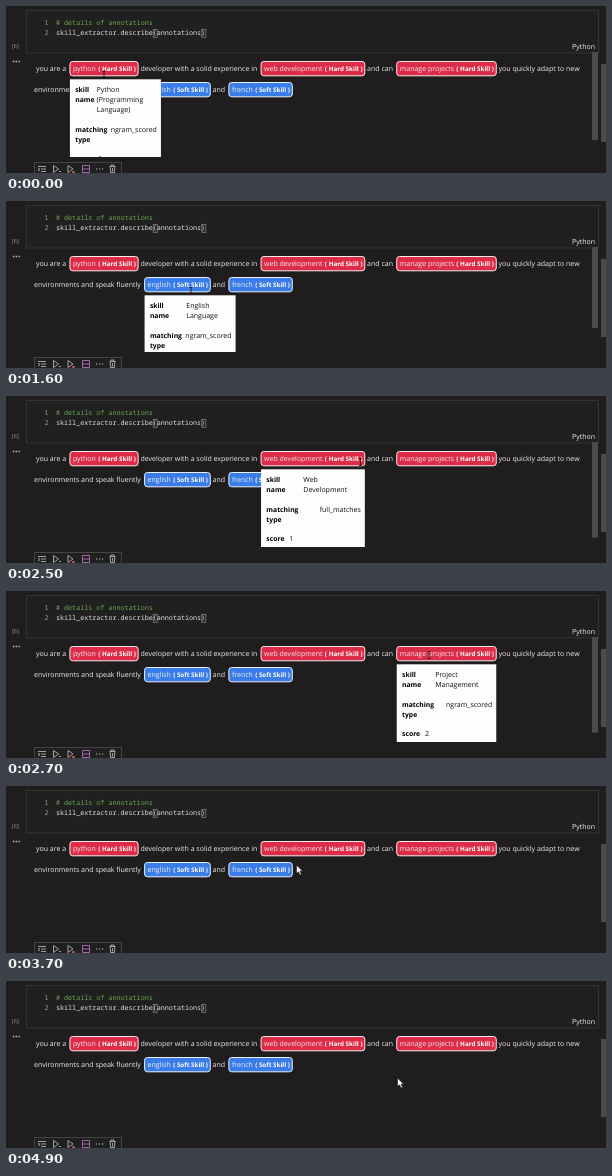
An HTML page for the animation above (5000 ms loop, 600 by 167 pixels).

```html
<!DOCTYPE html>
<html lang="en">
<head>
<meta charset="utf-8">
<title>Skill annotations</title>
<style>
  html, body { margin: 0; width: 100%; height: 100%; overflow: hidden; background: #1f1d1e; }
  svg { display: block; width: 600px; height: 167px; }
  text { font: 7px "Open Sans", "Noto Sans", sans-serif; fill: #eee; white-space: pre; text-rendering: geometricPrecision; }
  .code { font: 6.73px "Noto Sans Mono", "DejaVu Sans Mono", monospace; fill: #e4e4e4; }
  .comment { fill: #6aa84f; }
  .num { fill: #999; }
  .count { font-size: 5.5px; fill: #999; }
  .tag { font-size: 6.3px; font-weight: 700; fill: #fff; }
  .key { font-size: 6.8px; font-weight: 700; fill: #000; }
  .val { fill: #111; }
  .end { text-anchor: end; }
  .icon { fill: none; stroke: #c4c4c4; stroke-width: .8; }
</style>
</head>
<body>
<svg id="stage" viewBox="0 0 600 167">
  <defs><clipPath id="output"><rect width="600" height="151"/></clipPath></defs>
  <rect width="600" height="167" fill="#1f1d1e"/>
  <rect x="20.5" y="4.5" width="572" height="42.5" fill="#212021" stroke="#343334"/>
  <g fill="none" stroke="#8a8a8a" stroke-width=".7">
    <rect x="147.2" y="23.3" width="4" height="8"/>
    <rect x="195.8" y="23.3" width="4" height="8"/>
  </g>
  <rect x="595" y="58" width="5" height="78" fill="#4b4a4c"/>
  <g id="page"></g>
  <path d="M6.8 55.5h1.4M9.6 55.5h1.4M12.4 55.5h1.4" stroke="#c8c8c8" stroke-width="1.3"/>
  <rect x="28.5" y="156.5" width="87" height="14" fill="#212021" stroke="#454445"/>
  <g class="icon">
    <path d="M32 160.5h8M35 163h5M35 165.5h5M32 162l2 1.5-2 1.5"/>
    <path d="M47.5 159.5v7l5-3.5zM53 165.5h2"/>
    <path d="M62 159.5v7l5-3.5z"/>
    <path d="M66 166h3" stroke="#e05a5a" stroke-width="1.5"/>
    <path d="M76.5 159.5h7v7h-7zM76.5 163h7" stroke="#c07ac8"/>
    <path d="M90 163h1.2M93 163h1.2M96 163h1.2" stroke-width="1.2"/>
    <path d="M103.5 160.5h6M105 160v-1h3v1M104.2 161l.4 5.5h3.8l.4-5.5M106.5 162v3.5"/>
  </g>
  <g id="tips" clip-path="url(#output)"></g>
  <g id="cursor">
    <path id="arrow" d="M0 0v8.6l2-1.8 1.5 3.2 1.5-.7-1.5-3.1h2.7z" fill="#fff" stroke="#111" stroke-width=".6"/>
    <path id="beam" d="M-1.5-3.5h3M0-3.5v7M-1.5 3.5h3" fill="none" stroke="#26131a" stroke-width=".9"/>
  </g>
</svg>
<script>
const NS = "http://www.w3.org/2000/svg";
const $ = id => document.getElementById(id);
const page = $("page"), tips = $("tips");

function add(parent, tag, attrs, content) {
  const el = document.createElementNS(NS, tag);
  for (const k in attrs) el.setAttribute(k, attrs[k]);
  if (content) el.textContent = content;
  parent.appendChild(el);
  return el;
}

// writes a line of text and returns its width
const write = (parent, x, y, str, cls = "") =>
  add(parent, "text", { x, y, class: cls }, str).getComputedTextLength();

["# details of annotations", "skill_extractor.describe(annotations)"].forEach((line, i) => {
  const y = 19 + 10.2 * i;
  write(page, 38.5, y, String(i + 1), "code num");
  write(page, 50, y, line, i ? "code" : "code comment");
});
write(page, 6, 42, "[6]", "count");
write(page, 589, 43.3, "Python", "end");

const hard = { tag: "( Hard Skill )", fill: "#dc2c47", edge: "#fbe9ec" };
const soft = { tag: "( Soft Skill )", fill: "#3a7de8", edge: "#e9f1fd" };
const ngram = "ngram_scored";
const rows = [
  { x: 30, y: 65.4, parts: [
    "you are a",
    { kind: hard, name: "python", skill: ["Python", "(Programming", "Language)"], match: ngram, score: "1" },
    "developer with a solid experience in",
    { kind: hard, name: "web development", skill: ["Web", "Development"], match: "full_matches", score: "1" },
    "and can",
    { kind: hard, name: "manage projects", skill: ["Project", "Management"], match: ngram, score: "2" },
    "you quickly adapt to new"
  ] },
  { x: 28, y: 86.4, parts: [
    "environments and speak fluently",
    { kind: soft, name: "english", skill: ["English", "Language"], match: ngram, score: "1" },
    "and",
    { kind: soft, name: "french", skill: ["French", "Language"], match: ngram, score: "1" }
  ] }
];
const pills = [];
const PILL_H = 14.3, TRACK_TOP = 46, TRACK = 106;

function drawPill(p, x, base) {
  const box = add(page, "rect", {});
  const nameW = write(page, x + 3, base, p.name);
  const tagW = write(page, x + nameW + 5.3, base, p.kind.tag, "tag");
  Object.assign(p, { x, y: base - 9.9, w: nameW + tagW + 7.6 });
  const look = { x, y: p.y, width: p.w, height: PILL_H, rx: 2.8, fill: p.kind.fill, stroke: p.kind.edge };
  for (const k in look) box.setAttribute(k, look[k]);
  pills.push(p);
}

function drawTip(p) {
  const g = p.tip = add(tips, "g", {});
  const w = Math.max(91, p.w), right = p.x + w, x = p.x + 5.3, top = p.y + 17.8;
  add(g, "rect", { x: p.x, y: top, width: w, height: 90, fill: "#fdfdfd" });
  let y = top + 12.7;
  write(g, x, y, "skill", "key");
  write(g, x, y + 10, "name", "key");
  const values = add(g, "g", {});
  const widest = Math.max(...p.skill.map((s, i) => write(values, 0, y + 10 * i, s, "val")));
  values.setAttribute("transform", `translate(${right - 17.7 - widest} 0)`);
  y += 10 * p.skill.length + 9.5;
  write(g, x, y, "matching", "key");
  write(g, x, y + 10, "type", "key");
  write(g, right - 4, y, p.match, "val end");
  write(g, x, y + 29.5, "score", "key");
  write(g, x + 23, y + 29.5, p.score, "val");
  // scroll thumb shrinks as the content grows
  const content = y + 48 - TRACK_TOP;
  add(g, "rect", { x: 586, y: TRACK_TOP, width: 6, height: TRACK * TRACK / content, fill: "#4b4a4c" });
}

for (const row of rows) {
  let x = row.x;
  for (const part of row.parts) {
    if (part.name) {
      drawPill(part, x + 3.8, row.y);
      x = part.x + part.w + 2.3;
    } else {
      x += write(page, x, row.y, part);
    }
  }
}
pills.forEach(drawTip);

// pointer stops: time, x, y
const path = [
  [0, 98, 69], [400, 98, 69], [600, 98.5, 71.5], [1100, 182, 90], [1500, 182, 90], [1600, 185, 90],
  [1900, 286, 68], [2300, 286, 68], [2700, 423, 64], [3000, 436, 65], [3200, 436, 65],
  [3700, 290.5, 79], [4000, 270, 86], [4400, 270, 86], [4900, 391.5, 97], [5000, 391.5, 97]
];

function pointer(t) {
  const i = path.findIndex(k => k[0] > t), a = path[i - 1], b = path[i];
  const f = (t - a[0]) / (b[0] - a[0]);
  return [a[1] + (b[1] - a[1]) * f, a[2] + (b[2] - a[2]) * f];
}

const show = (el, on) => el.setAttribute("visibility", on ? "visible" : "hidden");

function draw(now) {
  // the picture advances in steps of 100 ms
  const t = Math.floor((now % 5000) / 100) * 100;
  const [x, y] = pointer(t);
  const hit = pills.find(p => x >= p.x && x <= p.x + p.w && y >= p.y && y <= p.y + PILL_H);
  pills.forEach(p => show(p.tip, p === hit));
  show($("arrow"), !hit);
  show($("beam"), hit);
  $("cursor").setAttribute("transform", `translate(${x} ${y})`);
}

const start = performance.now();
function tick() {
  draw(performance.now() - start);
  requestAnimationFrame(tick);
}
tick();
</script>
</body>
</html>
```
